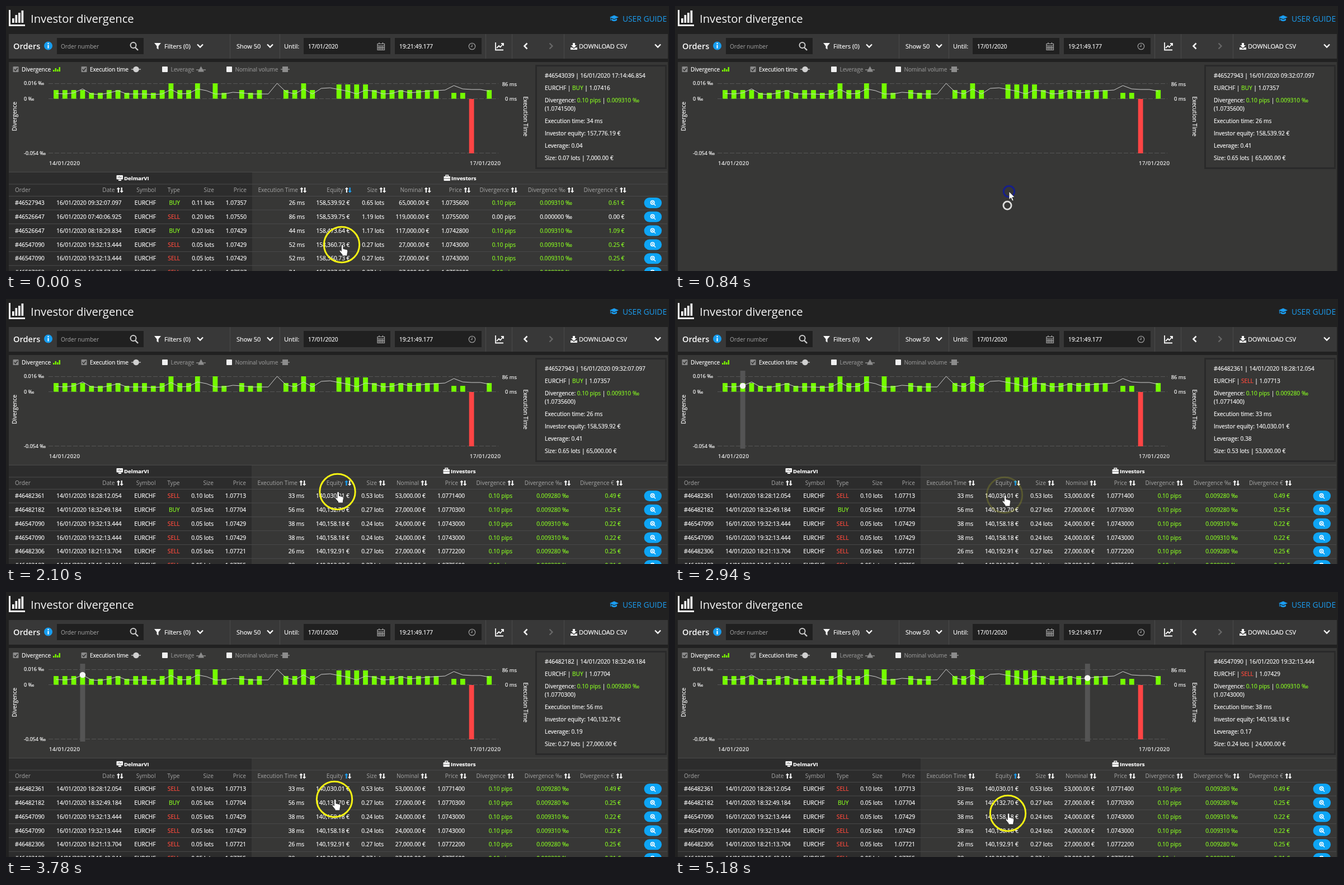
An HTML page for the animation above (6.27 s loop, 1185 by 473 pixels).

```html
<!DOCTYPE html>
<html lang="en">
<head>
<meta charset="utf-8">
<title>Investor divergence</title>
<style>
html, body { margin: 0; width: 100%; height: 100%; overflow: hidden; background: #212121; }
svg { display: block; width: 1185px; height: 473px; font-family: "Open Sans", sans-serif; }
text { white-space: pre; }
</style>
</head>
<body>
<svg id="stage" viewBox="0 0 1185 473"></svg>
<script>
const LOOP = 6270, STEP = 140;
const WHITE = '#f8f8f8', GREY = '#a6a6a6', GREEN = '#86f522', RED = '#ff4a3d', BLUE = '#0ea5f5';
const BODY = 10.1;

// Drawing helpers, each returning SVG markup
const rect = (x, y, w, h, fill, more = '') =>
  `<rect x="${x}" y="${y}" width="${w}" height="${h}" fill="${fill}" ${more}/>`;
// Small type gets a hairline outline to look as firm as hinted text
const ink = (color, size = BODY) =>
  `fill="${color}" stroke="${color}" stroke-width="${size < 12 && color !== GREY ? .22 : 0}"`;
const text = (x, y, str, { size = BODY, fill = WHITE, anchor = 'start', more = '' } = {}) =>
  `<text x="${x}" y="${y}" font-size="${size}" ${ink(fill, size)} text-anchor="${anchor}" ${more}>${str}</text>`;
const shape = (d, fill, more = '') => `<path d="${d}" fill="${fill}" ${more}/>`;
const line = (d, color = WHITE, width = 2, more = '') =>
  shape(d, 'none', `stroke="${color}" stroke-width="${width}" ${more}`);
const circle = (x, y, r, fill, more = '') => `<circle cx="${x}" cy="${y}" r="${r}" fill="${fill}" ${more}/>`;
const group = (id, body) => `<g id="${id}">${body}</g>`;
const chevron = (x, y) => line(`M${x - 5} ${y - 3}l5 5 5-5`, WHITE, 2.3);

function titleBar() {
  return line('M6.5 7V34.5H34', WHITE, 3) +
    [[11, 22], [16.5, 16], [22, 12], [27.5, 8]].map(([x, y]) => rect(x, y, 3.7, 30 - y, WHITE)).join('') +
    text(44, 30, 'Investor divergence', { size: 20.2 }) +
    shape('M1079 20l8-3.5 8 3.5-8 3.5zM1082 22.5l5 2.2 5-2.2v3q-5 3.5-10 0zM1080 21h1v5h-1z', '#1b9df0') +
    text(1102, 27.5, 'USER GUIDE', { size: 13.8, fill: '#1b9df0' });
}

function toolbar() {
  const dark = '#202020', label = { size: 11 };
  return rect(5, 50, 1178, 44, '#383838') +
    [400, 489, 857, 904, 997].map(x => rect(x, 50, 1, 44, '#4a4a4a')).join('') +
    [[91, 155], [532, 155], [695, 155]].map(([x, w]) => rect(x, 57, w, 29, dark)).join('') +
    text(13, 77, 'Orders', { size: 14.6, more: 'font-weight="600"' }) +
    circle(75.5, 71, 7.5, '#169df0') + rect(74.5, 69.5, 2, 6, '#fff') + circle(75.5, 67, 1.2, '#fff') +
    text(98, 75.5, 'Order number', { fill: GREY }) +
    circle(227.5, 70, 5, 'none', 'stroke="#ccc" stroke-width="2"') + line('M231 74l5 5', '#ccc', 2.4) +
    shape('M265 66h12l-4.5 5.5v6l-3-2v-4z', WHITE) +
    text(283, 76, 'Filters (0)', label) + chevron(347, 71.5) +
    text(412, 76, 'Show 50', label) + chevron(472, 71.5) +
    text(497, 76, 'Until:', label) +
    text(540, 75.5, '17/01/2020') + text(703, 75.5, '19:21:49.177') +
    line('M664 67.5h12.5v11H664zM664 71h12.5M664 74.7h12.5M667 71v7.5M670.2 71v7.5M673.4 71v7.5M667 65v3M673.4 65v3', '#aaa', 1.2) +
    circle(833, 72, 5.7, 'none', 'stroke="#999" stroke-width="1.3"') + line('M833 68.5v4h-2.5', '#999', 1.2) +
    line('M875 65v13.5h14', WHITE, 1.8) + line('M877 75l4-4 2.5 2.5 5-6M885 67h4v4', WHITE, 1.8) +
    line('M931.5 66.5l-5 5 5 5', WHITE, 2.5) + line('M971.5 66.5l5 5-5 5', '#686868', 2.3) +
    shape('M1013 66h4v4h3l-5 5-5-5h3zM1009 74h3l3 2.5 3-2.5h3v4h-12z', WHITE) +
    text(1024, 76, 'DOWNLOAD CSV', label) + chevron(1165, 71.5);
}

function legend() {
  const item = (x, str, on) =>
    rect(x, 108, 10, 10, on ? '#8a8a8a' : '#f0f0f0', 'rx="1"') +
    (on ? line(`M${x + 2} 113l2.3 2.5 4-5`, '#333', 1.6) : '') +
    text(x + 15.5, 116.7, str, { size: 10, fill: on ? WHITE : '#8c8c8c' });
  return item(12.5, 'Divergence', true) + item(134.5, 'Execution time', true) +
    item(279, 'Leverage', false) + item(394, 'Nominal volume', false) +
    [[84, 3], [87.5, 6], [91, 4], [94.5, 8]].map(([x, h]) => rect(x, 117 - h, 2.5, h, '#78f000')).join('') +
    line('M224 113h17', '#ccc', 1.3) + circle(232.5, 113, 5.3, '#d0d0d0') +
    line('M340 114h17M491 113h16', '#8c8c8c', 1.3) +
    shape('M348.5 107.5l5.5 10h-11z', '#8c8c8c') + rect(494, 108, 10, 10, '#8c8c8c');
}

const slotX = i => 89.5 + 15.8 * i;
const BARS = 'mmmmssmmsmmsmtmmt.ts.msm..mmtm..uuuummmmmmmm.ssr.m';
const BAR_TOP = { s: 155, m: 150, u: 140, t: 138 };
const TIME_Y = [156, 157, 155, 148, 157, 158, 155, 151, 157, 157, 157, 158, 157, 149, 157, 156, 148,
  151, 157, 157, 154, 155, 157, 157, 157, 138, 153, 157, 148, 157, 147, 146, 149, 152, 157, 150, 152,
  157, 156, 151, 155, 153.5, 152, 151, 150, 142, 148, 149, 149, 152];

function chart() {
  const axis = { size: 9 }, right = { size: 9.4, anchor: 'end' };
  const date = { size: 9.5, more: 'letter-spacing=".5"' };
  const bars = [...BARS].map((kind, i) => {
    const x = slotX(i) - 4.4;
    if (kind === 'r') return rect(x, 166, 8.8, 97, '#ff4444');
    return kind === '.' ? '' : rect(x, BAR_TOP[kind], 8.8, 165.5 - BAR_TOP[kind], '#74fc00');
  }).join('');
  return line('M76 138.5H880M76 165.5H880M76 262.5H880', '#565656', 1, 'stroke-dasharray="8 3"') +
    group('hover', rect(-4.5, 128, 9, 139, '#545454')) + bars +
    line('M' + TIME_Y.map((y, i) => `${slotX(i)} ${y}`).join('L'), '#cfcfcf', 1) +
    circle(0, 0, 5.3, '#f5f5f5', 'id="marker"') +
    text(32, 140.5, '0.016 ‰', axis) + text(32, 169, '0 ‰', axis) + text(32, 266, '-0.054 ‰', axis) +
    text(913, 142.5, '86 ms', right) + text(913, 169, '0 ms', right) +
    text(77, 283.5, '14/01/2020', date) + text(829, 283.5, '17/01/2020', date) +
    text(0, 0, 'Divergence', { size: 10, anchor: 'middle', more: 'transform="translate(18.5 197) rotate(-90)"' }) +
    text(0, 0, 'Execution Time', { anchor: 'middle', more: 'transform="translate(924.5 197) rotate(90)"' });
}

// order | date | type | size | price | ms | equity | lots | nominal | investor price | pips | per mille | euro | leverage
const parse = src => src.trim().split('\n').map(row => row.trim().split('|'));
const BEFORE = parse(`
  46527943|16/01/2020 09:32:07.097|BUY|0.11|1.07357|26|158,539.92|0.65|65,000.00|1.0735600|0.10|0.009310|0.61|0.41
  46526647|16/01/2020 07:40:06.925|SELL|0.20|1.07550|86|158,539.75|1.19|119,000.00|1.0755000|0.00|0.000000|0.00|0.75
  46526647|16/01/2020 08:18:29.834|BUY|0.20|1.07429|44|158,473.64|1.17|117,000.00|1.0742800|0.10|0.009310|1.09|0.74
  46547090|16/01/2020 19:32:13.444|SELL|0.05|1.07429|52|158,360.73|0.27|27,000.00|1.0743000|0.10|0.009310|0.25|0.17
  46547090|16/01/2020 19:32:13.444|SELL|0.05|1.07429|52|158,360.73|0.27|27,000.00|1.0743000|0.10|0.009310|0.25|0.17
  46507853|15/01/2020 16:37:57.834|SELL|0.05|1.07527|34|158,327.87|0.27|27,000.00|1.0752800|0.10|0.009300|0.61|0.17`);
const AFTER = parse(`
  46482361|14/01/2020 18:28:12.054|SELL|0.10|1.07713|33|140,030.01|0.53|53,000.00|1.0771400|0.10|0.009280|0.49|0.38
  46482182|14/01/2020 18:32:49.184|BUY|0.05|1.07704|56|140,132.70|0.27|27,000.00|1.0770300|0.10|0.009280|0.25|0.19
  46547090|16/01/2020 19:32:13.444|SELL|0.05|1.07429|38|140,158.18|0.24|24,000.00|1.0743000|0.10|0.009310|0.22|0.17
  46547090|16/01/2020 19:32:13.444|SELL|0.05|1.07429|38|140,158.18|0.24|24,000.00|1.0743000|0.10|0.009310|0.22|0.17
  46482306|14/01/2020 18:21:13.704|SELL|0.05|1.07721|26|140,192.91|0.27|27,000.00|1.0772200|0.10|0.009280|0.25|0.19
  46482183|14/01/2020 17:15:42.844|SELL|0.05|1.07755|38|140,212.87|0.27|27,000.00|1.0775600|0.10|0.009280|0.21|0.19`);
const FIRST = parse('46543039|16/01/2020 17:14:46.854|BUY|0.01|1.07416|34|157,776.19|0.07|7,000.00|1.0741500|0.10|0.009310|0.07|0.04')[0];
const sideColor = type => type === 'BUY' ? GREEN : RED;

const HEADS = ['Date', 'Symbol', 'Type', 'Size', 'Price', 'Execution Time', 'Equity', 'Size', 'Nominal',
  'Price', 'Divergence', 'Divergence ‰', 'Divergence €'];
const UP = 'M0-5L3.2-1.4H1.1V4.6H-1.1V-1.4H-3.2Z';

function table(id, rows, edge, ends, blueArrow) {
  const arrows = (x, sorted) => [0, 1].map(i =>
    shape(UP, sorted && i === blueArrow ? '#1b9df0' : WHITE,
      `transform="translate(${x - 5.6 + i * 5.8} 328.5) rotate(${i * 180})"`)).join('');
  const head = text(16, 332, 'Order', { fill: GREY }) + HEADS.map((str, i) => {
    const sortable = i === 0 || i > 4;
    return text(ends[i] - (sortable ? 12 : 0), 332, str, { fill: GREY, anchor: 'end' }) +
      (sortable ? arrows(ends[i], str === 'Equity') : '');
  }).join('');
  const body = rows.map((r, n) => {
    const y = 351.5 + 24.8 * n, gain = r[10] === '0.00' ? WHITE : GREEN;
    const cells = [r[1], 'EURCHF', r[2], r[3] + ' lots', r[4], r[5] + ' ms', r[6] + ' €', r[7] + ' lots',
      r[8] + ' €', r[9], r[10] + ' pips', r[11] + ' ‰', r[12] + ' €'];
    return text(16, y + 3.7, '#' + r[0]) +
      cells.map((str, i) => text(ends[i], y + 3.7, str,
        { anchor: 'end', fill: i === 2 ? sideColor(str) : i > 9 ? gain : WHITE })).join('') +
      rect(1140.5, y - 9.5, 31.5, 19, BLUE, 'rx="9.5"') +
      circle(1155.5, y - .7, 3.2, 'none', 'stroke="#fff" stroke-width="1.6"') +
      line(`M1158 ${y + 1.8}l3 3M1154 ${y - .7}h3M1155.5 ${y - 2.2}v3`, '#fff', 1.3) +
      rect(5, y + 12, 1177, 1, '#4a4a4a');
  }).join('');
  const bold = { size: 9.6, more: 'font-weight="700"' }, shift = edge - 440;
  return group(id,
    rect(5, 297, edge - 5, 176, '#2c2c2c') +
    [296, 317.5, 339].map(y => rect(5, y, 1177, 1, '#4a4a4a')).join('') +
    rect(197.5, 302, 11.5, 7.5, WHITE, 'rx="1"') + rect(201, 310, 5, 2, WHITE) +
    line('M199.5 306h2l1-2 1.5 3 1-1.5h2', '#555', .8) +
    text(211, 311, 'DelmarVI', bold) +
    rect(782.5 + shift, 304, 11.5, 8, WHITE, 'rx="1"') + line(`M${786 + shift} 304v-2h4.5v2`, WHITE, 1.3) +
    rect(782.5 + shift, 307.5, 11.5, .8, '#555') +
    text(796 + shift, 311, 'Investors', bold) + head + body);
}

function details(r) {
  const span = (str, color) => `<tspan ${ink(color)}>${str}</tspan>`;
  const rows = [
    [128, `#${r[0]} | ${r[1]}`],
    [150, `EURCHF | ${span(r[2], sideColor(r[2]))} | ${r[4]}`],
    [172, `Divergence: ${span(r[10] + ' pips', GREEN)} | ${span(r[11] + ' ‰', GREEN)}`],
    [187, `(${r[9]})`],
    [209, `Execution time: ${r[5]} ms`],
    [231, `Investor equity: ${r[6]} €`],
    [253, `Leverage: ${r[13]}`],
    [274.5, `Size: ${r[7]} lots | ${r[8]} €`]];
  return rows.map(([y, str]) => text(963, y, str)).join('');
}

const HAND = 'M-1.6 1.6a1.7 1.7 0 0 1 3.4 0V7l5.6 1.3q2.2.6 2 3l-1 5.2V19H0v-2L-4.6 11.5q-.6-2.6 1.4-2l1.6 1.5z';
const ARROW = 'M0 0V14.5L3.4 11.4 5.8 17 8.2 16 5.8 10.5H10.2Z';

const stage = document.getElementById('stage');
stage.innerHTML = rect(0, 0, 1185, 473, '#212121') + titleBar() + toolbar() +
  rect(5, 100, 1178, 373, '#373736') + legend() + chart() +
  rect(947.5, 106.5, 232, 183, '#373736', 'stroke="#2a2a2a" stroke-width="3"') + group('details', '') +
  table('before', BEFORE, 440, [206.5, 268, 311, 372, 430, 534, 614.5, 676, 756.5, 827, 911, 1012, 1105.5], 1) +
  table('after', AFTER, 439, [206.5, 267.5, 310.5, 371, 429, 533, 614, 675, 750, 820, 905, 1006, 1099], 0) +
  circle(594, 356, 7, 'none', 'id="loader" stroke="#f2f2f2" stroke-width="2.8"') +
  group('pointer',
    circle(0, 0, 10, 'none', 'id="click" stroke="#101a9c" stroke-width="3"') +
    circle(0, 0, 31.7, 'none', 'id="halo" stroke="#f4f214" stroke-width="3"') +
    shape(HAND, '#fff', 'id="hand" transform="translate(1 0) scale(1.05)" stroke="#222" stroke-width=".9"') +
    shape(ARROW, '#fff', 'id="arrow" stroke="#222" stroke-width=".8"'));

const el = id => document.getElementById(id);
const set = (id, attrs) => { for (const key in attrs) el(id).setAttribute(key, attrs[key]); };
const show = (id, on) => set(id, { visibility: on ? 'visible' : 'hidden' });

const PATH = [[0, 600, 426], [420, 597, 331], [1960, 597, 331], [2100, 592.5, 344], [2240, 589, 350],
  [3080, 589, 350], [3780, 587, 370], [4480, 587, 370], [5180, 595, 395]];
const PANEL = [[0, FIRST], [140, BEFORE[2]], [280, BEFORE[0]], [2240, AFTER[0]], [3640, AFTER[1]], [5040, AFTER[2]]];
const HOVER = [[0, -1], [2240, 2], [3640, 3], [5040, 41]];

const at = (steps, t) => steps.filter(s => s[0] <= t).pop()[1];

function position(t) {
  const next = PATH.findIndex(p => p[0] > t);
  if (next < 0) return PATH[PATH.length - 1].slice(1);
  const a = PATH[next - 1], b = PATH[next], k = (t - a[0]) / (b[0] - a[0]);
  return [a[1] + (b[1] - a[1]) * k, a[2] + (b[2] - a[2]) * k];
}

function haloOpacity(t) {
  if (t < 700 || t >= 3220) return 1;
  if (t < 2100) return 0;
  return Math.min(1, Math.max(0, 1 - (t - 2240) / 840));
}

let shownOrder, lastTime;
function render(t) {
  if (t === lastTime) return;
  lastTime = t;
  const loading = t >= 700 && t < 1540;
  show('before', t < 700);
  show('after', t >= 1540);
  show('loader', loading);
  show('arrow', loading);
  show('hand', !loading);
  show('click', loading);
  set('halo', { opacity: haloOpacity(t) });
  set('pointer', { transform: `translate(${position(t)})` });

  if (loading) {
    const p = (t - 630) / 1000, grow = Math.min(p / .7, 1);
    set('loader', {
      r: 15 * (.1 + .9 * (1 - (1 - grow) ** 1.5)),
      opacity: p < .7 ? 1 - .35 * grow : .65 * (1 - p) / .3
    });
    set('click', { r: 7.5 + (t - 700) / 64, opacity: 1 - (t - 700) / 840 });
  }

  const order = at(PANEL, t), slot = at(HOVER, t);
  if (order !== shownOrder) el('details').innerHTML = details(shownOrder = order);
  show('hover', slot >= 0);
  show('marker', slot >= 0);
  if (slot >= 0) {
    set('hover', { transform: `translate(${slotX(slot)} 0)` });
    set('marker', { cx: slotX(slot), cy: TIME_Y[slot] });
  }
}

const start = performance.now();
function tick() {
  const t = (performance.now() - start) % LOOP;
  render(Math.floor(t / STEP) * STEP);
  requestAnimationFrame(tick);
}
tick();
</script>
</body>
</html>
```
